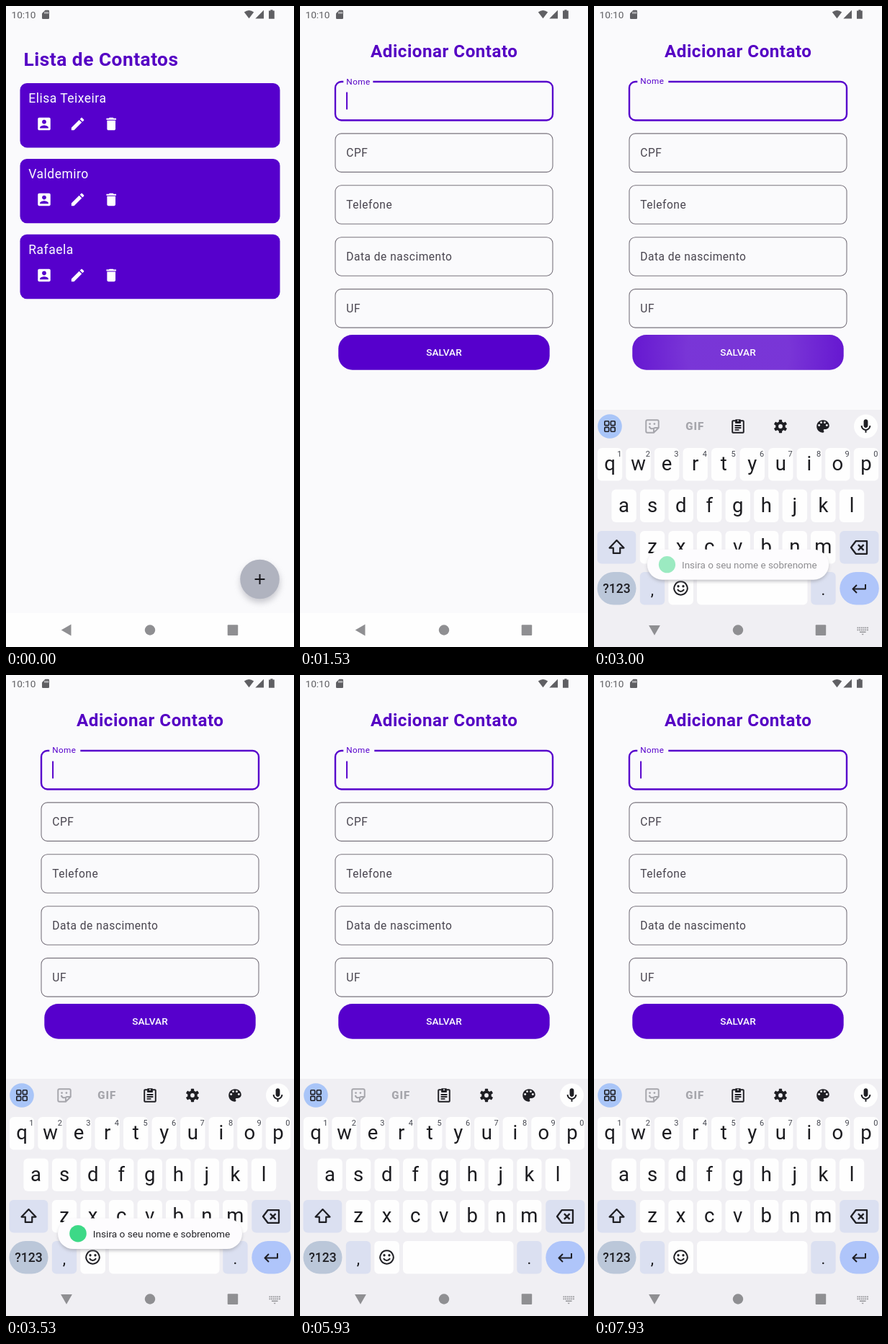
Write an HTML page that moves like this. It is 400 px wide and 889 px high and loops after 8000 ms.

```html
<!DOCTYPE html>
<html lang="pt">
<head>
<meta charset="utf-8">
<title>Lista de Contatos</title>
<style>
html, body { margin: 0; width: 100%; height: 100%; overflow: hidden; background: #fafafc; }
svg { display: block; width: 400px; height: 889px; font-family: Roboto, sans-serif; }
.title { font-weight: 700; fill: #5500c4; letter-spacing: .49px; }
.name { font-size: 17.5px; fill: #fdfdff; letter-spacing: .49px; }
.label { font-size: 15.57px; fill: #49454f; letter-spacing: .49px; }
.key { font-size: 27.5px; fill: #1b1b1f; text-anchor: middle; }
.digit { font-size: 11px; fill: #44464f; text-anchor: middle; }
</style>
</head>
<body>
<svg id="stage" viewBox="0 0 400 889" xmlns="http://www.w3.org/2000/svg"></svg>
<script>
const LOOP = 8000;
const PURPLE = '#5600cc', PAGE = '#fafafc', BOARD = '#f0eff3', KEY = '#fefefe', SIDE = '#dbe0f1', INK = '#1f1f24';
const stage = document.getElementById('stage');

const rect = (x, y, w, h, r, fill, more = '') =>
  `<rect x="${x}" y="${y}" width="${w}" height="${h}" rx="${r}" fill="${fill}" ${more}/>`;
const disc = (x, y, r, fill, more = '') => `<circle cx="${x}" cy="${y}" r="${r}" fill="${fill}" ${more}/>`;
const text = (x, y, s, more = '') => `<text x="${x}" y="${y}" ${more}>${s}</text>`;
const path = (d, more = '') => `<path d="${d}" ${more}/>`;
const group = (id, body) => `<g id="${id}">${body}</g>`;
// 24-unit icon centred on x, y
const icon = (x, y, body, fill = INK, scale = .973) =>
  `<g transform="translate(${x} ${y}) scale(${scale}) translate(-12 -12)" fill="${fill}">${body}</g>`;
const line = (d, color = INK, w = 2, more = '') =>
  path(d, `fill="none" stroke="${color}" stroke-width="${w}" stroke-linejoin="round" ${more}`);

const PERSON = path('M3 5v14c0 1.1.89 2 2 2h14c1.1 0 2-.9 2-2V5c0-1.1-.9-2-2-2H5c-1.11 0-2 .9-2 2zm12 4c0 1.66-1.34 3-3 3s-3-1.34-3-3 1.34-3 3-3 3 1.34 3 3zm-9 8c0-2 4-3.1 6-3.1s6 1.1 6 3.1v1H6v-1z');
const PENCIL = path('M3 17.25V21h3.75L17.81 9.94l-3.75-3.75L3 17.25zM20.71 7.04c.39-.39.39-1.02 0-1.41l-2.34-2.34c-.39-.39-1.02-.39-1.41 0l-1.83 1.83 3.75 3.75 1.83-1.83z');
const TRASH = path('M6 19c0 1.1.9 2 2 2h8c1.1 0 2-.9 2-2V7H6v12zM19 4h-3.5l-1-1h-5l-1 1H5v2h14V4z');
const MIC = path('M12 14c1.66 0 3-1.34 3-3V5c0-1.66-1.34-3-3-3S9 3.34 9 5v6c0 1.66 1.34 3 3 3zM17 11c0 2.76-2.24 5-5 5s-5-2.24-5-5H5c0 3.53 2.61 6.43 6 6.92V21h2v-3.08c3.39-.49 6-3.39 6-6.92z');
const PALETTE = path('M12 3c-4.97 0-9 4.03-9 9s4.03 9 9 9c.83 0 1.5-.67 1.5-1.5 0-.39-.15-.74-.39-1.01-.23-.26-.38-.61-.38-.99 0-.83.67-1.5 1.5-1.5H16c2.76 0 5-2.24 5-5 0-4.42-4.03-8-9-8z') +
  [[6.5, 10.5], [9.5, 6.5], [14.5, 6.5], [17.5, 10.5]].map(([x, y]) => disc(x, y, 1.5, BOARD)).join('');
const GEAR = disc(12, 12, 5, 'none', `stroke="${INK}" stroke-width="4"`) +
  [0, 60, 120, 180, 240, 300].map(a => rect(9.8, 2.4, 4.4, 4, .8, INK, `transform="rotate(${a} 12 12)"`)).join('');

function card(name, i) {
  const y = 107 + i * 104.9;
  return rect(19.5, y, 361, 89.4, 9.5, PURPLE) + text(31.3, y + 27, name, 'class="name"') +
    [PERSON, PENCIL, TRASH].map((p, k) => icon(53 + k * 46.6, y + 56.6, p, '#fefeff')).join('');
}

function listScreen() {
  return text(24.6, 83, 'Lista de Contatos', 'class="title" font-size="26.3"') +
    ['Elisa Teixeira', 'Valdemiro', 'Rafaela'].map(card).join('') +
    disc(353, 800, 27.5, '#b4b4bc', 'filter="url(#soft)" opacity=".7"') +
    disc(352.5, 795, 27.3, '#b0b3bf') +
    line('M345.6 795h13.8M352.5 788.1v13.8', '#15151a');
}

function formScreen() {
  const fields = ['Nome', 'CPF', 'Telefone', 'Data de nascimento', 'UF'].map((s, i) => {
    const y = 105 + i * 71.9;
    const frame = rect(49, y, 302, 53.5, 8.5, 'none', `stroke="#79747e" stroke-width="1.1" ${i ? '' : 'id="box"'}`);
    return i ? frame + text(64.3, y + 32.2, s, 'class="label"')
      : frame + rect(60.3, 102, 0, 6, 0, PAGE, 'id="gap"') + text(64.3, 137, s, 'class="label" id="nome"');
  }).join('');
  return text(98, 71, 'Adicionar Contato', 'class="title" font-size="24.2"') + fields +
    rect(64.1, 119.5, 2, 24, 0, PURPLE, 'id="caret"') +
    rect(53.3, 456, 293.4, 48.8, 19.5, PURPLE) +
    `<g clip-path="url(#btn)">${disc(200, 480.5, 10, 'url(#glow)', 'id="ripple"')}</g>` +
    text(200, 485.4, 'SALVAR', 'font-size="13.6" font-weight="500" letter-spacing=".1" text-anchor="middle" fill="#fefeff"');
}

function keys(letters, x0, top, digits) {
  return [...letters].map((c, i) => {
    const x = x0 + i * 39.55;
    return rect(x - 17.2, top, 34.4, 45.5, 6, KEY) + text(x, top + 31, c, 'class="key"') +
      (digits ? text(x + 13.3, top + 12.3, (i + 1) % 10, 'class="digit"') : '');
  }).join('');
}

function keyboard() {
  const grey = '#a6a6ac';
  const grid = [[4, 4], [13.5, 4], [4, 13.5], [13.5, 13.5]]
    .map(([x, y]) => rect(x, y, 6.5, 6.5, 1.2, 'none', `stroke="${INK}" stroke-width="1.8"`)).join('');
  const sticker = line('M5 3h14q2 0 2 2v9l-7 7H5q-2 0-2-2V5q0-2 2-2zM14 21v-5q0-2 2-2h5M7.5 12q2 4.5 6 3', grey) +
    disc(8.5, 8.5, 1.4, grey) + disc(15, 8.5, 1.4, grey);
  const clip = line('M5 4h14q1 0 1 1v15q0 1-1 1H5q-1 0-1-1V5q0-1 1-1zM7.5 11h9M7.5 14h9M7.5 17h6') +
    rect(8, 2, 8, 6, 1, INK) + disc(12, 4, 1, BOARD);
  const face = line('M12 3a9 9 0 1 0 .01 0zM7.5 13.5q4.5 6 9 0') + disc(8.6, 9.3, 1.6, INK) + disc(15.4, 9.3, 1.6, INK);
  return rect(0, 560, 400, 329, 0, BOARD) +
    disc(22, 583, 16.8, '#a9c5f8') + icon(22, 583, grid, INK, .9) +
    icon(81, 583, sticker, grey) +
    text(140.3, 588.3, 'GIF', `font-size="15" font-weight="900" letter-spacing="1" text-anchor="middle" fill="${grey}"`) +
    icon(200, 583, clip) + icon(259, 583, GEAR) + icon(318, 583, PALETTE) +
    disc(377.5, 583, 16.5, KEY) + icon(377.5, 583, MIC) +
    keys('qwertyuiop', 22, 613, true) + keys('asdfghjkl', 41.6, 670.5) + keys('zxcvbnm', 81, 728) +
    rect(4.5, 728, 53.8, 45.5, 6, SIDE) + icon(31.5, 750.5, line('M12 3L2.5 13H7.5v7h9v-7h5z', INK, 2.1), INK, 1.05) +
    rect(341.3, 728, 54.2, 45.5, 6, SIDE) +
    icon(368, 751, line('M8 4h14v16H8L2 12zM11 8.5l7 7M18 8.5l-7 7', INK, 2.1), INK, 1.1) +
    rect(4.5, 785, 54, 45.5, 22.7, '#bbc7d9') +
    text(31.5, 813.5, '?123', `font-size="17.5" font-weight="500" text-anchor="middle" fill="${INK}"`) +
    rect(63.8, 785, 34.4, 45.5, 6, SIDE) + text(81, 817, ',', 'class="key" style="font-size:22px"') +
    rect(103.3, 785, 34.6, 45.5, 6, KEY) + icon(120.5, 807.5, face, INK, 1.02) +
    rect(143, 785, 153.5, 45.5, 6, KEY) +
    rect(301.3, 785, 34.4, 45.5, 6, SIDE) + text(318.5, 817, '.', 'class="key" style="font-size:22px"') +
    rect(341.3, 785, 54.5, 45.5, 22.7, '#afc5fa') +
    line('M377 802v6.5H360M365 803l-5.5 5.5 5.5 5.5');
}

function toast() {
  return group('toastBack',
    rect(73, 757, 254, 41, 20.5, '#85858c', 'filter="url(#soft2)" opacity=".55"') +
    rect(72, 753.5, 256, 42.5, 21.2, '#fdfcfe')) +
    group('toastBody', disc(100, 774.7, 11.8, '#3dd987') +
      text(120.8, 779.7, 'Insira o seu nome e sobrenome', 'font-size="13.67" fill="#222226"'));
}

function statusBar() {
  return `<g fill="#5f5f63">${text(7.5, 17, '10:10', 'font-size="13.6"')}
    ${path('M54.5 5.8h4.3q1.2 0 1.2 1.2v9.8q0 1.2-1.2 1.2h-7.6q-1.2 0-1.2-1.2V10.3z')}
    ${path('M54 8v2.8M56.1 8v2.8M58.2 8v2.8', `stroke="${PAGE}" stroke-width="1"`)}
    ${path('M330.8 8.5q6.7-5 13.4 0L337.5 17.3z')}
    ${path('M358 5.8v11.7h-11.7z')}
    ${path('M367.3 5.2h3.2v1.3h2.3v11.3h-7.8V6.5h2.3z')}</g>`;
}

function navBar() {
  const grey = '#939397';
  return `<g fill="#8f8f92">` + path('M-7.3 0L6.5-7.9V7.9z', 'id="back"') +
    disc(200, 865.5, 7.2, '#8f8f92') + rect(307.7, 858.3, 14.5, 14.8, 1, '#8f8f92') + '</g>' +
    group('swap', line('M365.5 862.3h15.4M365.5 865.3h15.4', grey, 1.7, 'stroke-dasharray="1.8 .92"') +
      line('M369 868.3h8.6', grey, 1.5) + path('M371.5 870.8h3.4l-1.7 1.7z', `fill="${grey}"`));
}

stage.innerHTML = `<defs>
  <filter id="soft" x="-50%" y="-50%" width="200%" height="200%"><feGaussianBlur stdDeviation="4"/></filter>
  <filter id="soft2" x="-10%" y="-50%" width="120%" height="200%"><feGaussianBlur stdDeviation="2.5"/></filter>
  <radialGradient id="glow"><stop offset=".4" stop-color="#fff" stop-opacity=".21"/>
    <stop offset="1" stop-color="#fff" stop-opacity=".05"/></radialGradient>
  <clipPath id="btn">${rect(53.3, 456, 293.4, 48.8, 19.5, '#000')}</clipPath></defs>` +
  rect(0, 0, 400, 889, 0, PAGE) + rect(0, 842, 400, 47, 0, '#fefefe') + statusBar() +
  group('list', listScreen()) + group('form', formScreen()) +
  group('board', keyboard()) + navBar() + group('toast', toast());

const el = {};
stage.querySelectorAll('[id]').forEach(n => el[n.id] = n);
const set = (id, attrs) => { for (const k in attrs) el[id].setAttribute(k, attrs[k]); };
const show = (id, on) => set(id, { display: on ? 'inline' : 'none' });
const mix = (a, b, p) => a + (b - a) * p;
const span = (t, start, len) => Math.min(1, Math.max(0, (t - start) / len));
const tint = (a, b, p) => `rgb(${a.map((v, i) => Math.round(mix(v, b[i], p)))})`;

// cubic-bezier(.4, 0, .2, 1)
function ease(x) {
  if (x <= 0 || x >= 1) return x;
  let lo = 0, hi = 1, u = x;
  for (let i = 0; i < 24; i++) {
    u = (lo + hi) / 2;
    const v = 1 - u;
    if (1.2 * v * v * u + .6 * v * u * u + u * u * u < x) lo = u; else hi = u;
  }
  return 3 * (1 - u) * u * u + u * u * u;
}

function draw(t) {
  const fade = span(t, 125, 700);
  set('list', { opacity: 1 - fade });
  show('list', fade < 1);
  set('form', { opacity: fade });

  const focus = ease(span(t, 1420, 150));
  set('box', { stroke: focus > 0 ? PURPLE : '#79747e', 'stroke-width': mix(1.1, 2.4, focus) });
  set('gap', { width: mix(0, 43, focus) });
  set('nome', { y: mix(137, 108.2, focus) });
  el.nome.style.fontSize = mix(15.57, 11.67, focus) + 'px';
  el.nome.style.letterSpacing = mix(.49, .39, focus) + 'px';
  el.nome.style.fill = tint([73, 69, 79], [86, 0, 204], focus);
  show('caret', t >= 1420 && (t < 1460 || (t - 1460) % 1000 < 500));

  const press = ease(span(t, 2760, 300));
  set('ripple', { r: mix(40, 180, press), opacity: span(t, 2760, 80) * (1 - span(t, 3030, 250)) });

  const up = ease(span(t, 1890, 290));
  set('board', { transform: `translate(0 ${mix(330, 0, up)})` });
  show('board', up > 0);
  set('back', { transform: `translate(84 865.5) rotate(${-90 * up})` });
  set('swap', { opacity: up });

  const shown = span(t, 2900, 200) * (1 - span(t, 5000, 200));
  show('toast', shown > 0);
  set('toast', { transform: `translate(200 774.7) scale(${mix(.97, 1, shown)}) translate(-200 -774.7)` });
  set('toastBack', { opacity: Math.min(1, shown * 2) });
  set('toastBody', { opacity: shown });
}

function tick() {
  draw(performance.now() % LOOP);
  requestAnimationFrame(tick);
}
tick();
</script>
</body>
</html>
```
